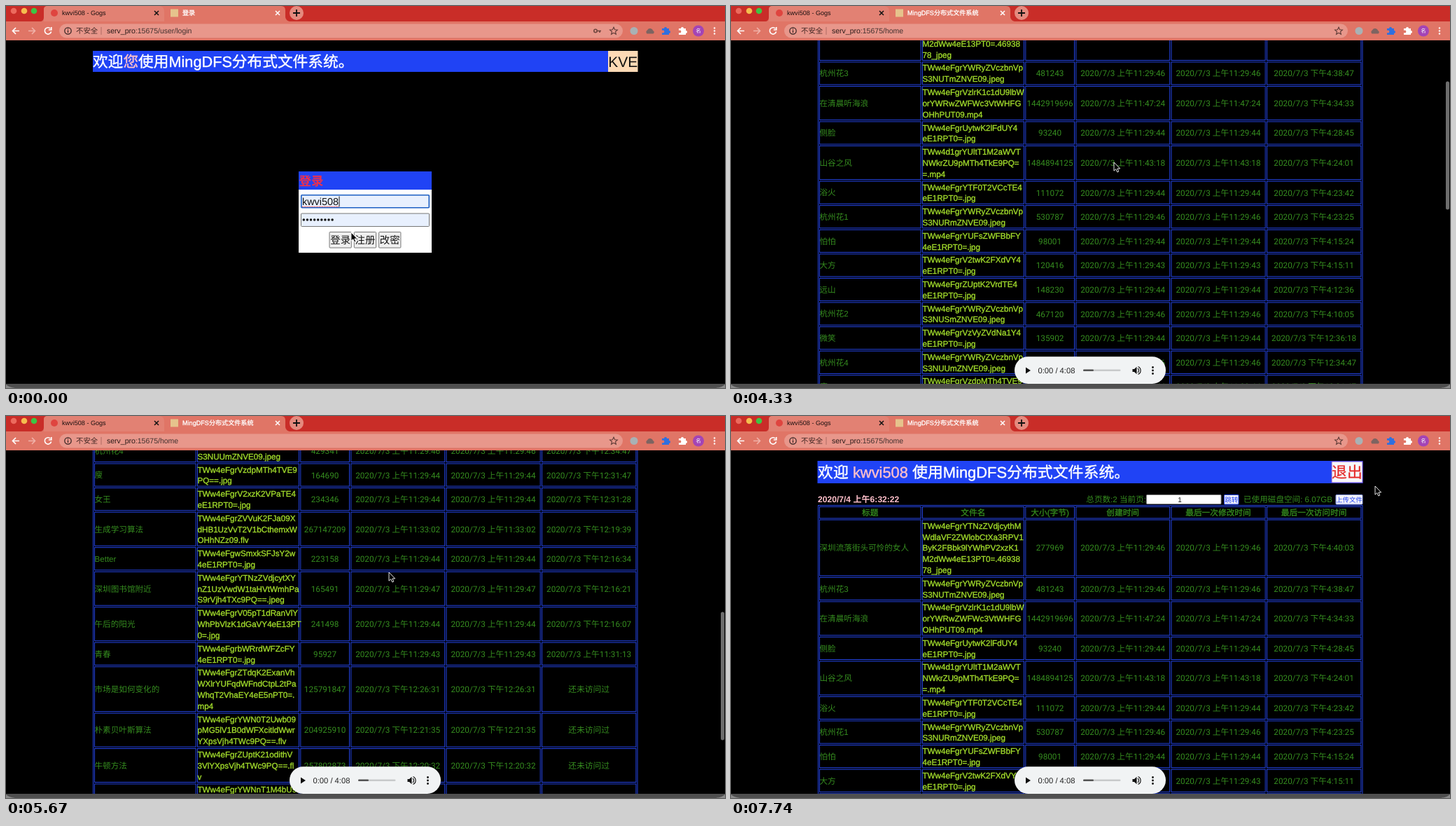
An HTML page that plays this animation: 1027x545 px, repeating every 8 s.

```html
<!DOCTYPE html>
<html lang="zh-CN">
<head>
<meta charset="utf-8">
<title>MingDFS</title>
<style>
html, body { margin: 0; width: 100%; height: 100%; overflow: hidden; background: #000; }
svg { display: block; width: 100vw; height: 100vh; }
text { font-family: "Liberation Sans", "Noto Sans CJK SC", "Noto Sans CJK", sans-serif; white-space: pre; text-rendering: geometricPrecision; }
.num { font-family: Roboto, "Noto Sans CJK SC", "Noto Sans CJK", sans-serif; }
</style>
</head>
<body>
<svg id="stage" viewBox="0 0 1027 545"></svg>
<script>
const LOOP = 8000, STEP = 148.8;
const BLUE = '#2043f5', LINE = '#2444e4', GREEN = '#358c1f', LIME = '#a2dc2c', PINK = '#ffc0cb', BAR = '#e07566';
const USER = 'kwvi508';

// title | size | created | last access | file name lines
const ROWS = `深圳流落街头可怜的女人|277969|A11:29:46|P4:40:03|TWw4eFgrYTNzZVdjcythM WdlaVF2ZWlobCtXa3RPV1 ByK2FBbk9lYWhPV2xzK1 M2dWw4eE13PT0=.46938 78_jpeg
杭州花3|481243|A11:29:46|P4:38:47|TWw4eFgrYWRyZVczbnVp S3NUTmZNVE09.jpeg
在清晨听海浪|1442919696|A11:47:24|P4:34:33|TWw4eFgrVzlrK1c1dU9lbW orYWRwZWFWc3VtWHFG OHhPUT09.mp4
侧脸|93240|A11:29:44|P4:28:45|TWw4eFgrUytwK2lFdUY4 eE1RPT0=.jpg
山谷之风|1484894125|A11:43:18|P4:24:01|TWw4d1grYUltT1M2aWVT NWkrZU9pMTh4TkE9PQ= =.mp4
浴火|111072|A11:29:44|P4:23:42|TWw4eFgrYTF0T2VCcTE4 eE1RPT0=.jpg
杭州花1|530787|A11:29:46|P4:23:25|TWw4eFgrYWRyZVczbnVp S3NURmZNVE09.jpeg
怕怕|98001|A11:29:44|P4:15:24|TWw4eFgrYUFsZWFBbFY 4eE1RPT0=.jpg
大方|120416|A11:29:43|P4:15:11|TWw4eFgrV2twK2FXdVY4 eE1RPT0=.jpg
远山|148230|A11:29:44|P4:12:36|TWw4eFgrZUptK2VrdTE4 eE1RPT0=.jpg
杭州花2|467120|A11:29:46|P4:10:05|TWw4eFgrYWRyZVczbnVp S3NUSmZNVE09.jpeg
微笑|135902|A11:29:44|P12:36:18|TWw4eFgrVzVyZVdNa1Y4 eE1RPT0=.jpg
杭州花4|429341|A11:29:46|P12:34:47|TWw4eFgrYWRyZVczbnVp S3NUUmZNVE09.jpeg
廋|164690|A11:29:44|P12:31:47|TWw4eFgrVzdpMTh4TVE9 PQ==.jpg
女王|234346|A11:29:44|P12:31:28|TWw4eFgrV2xzK2VPaTE4 eE1RPT0=.jpg
生成学习算法|267147209|A11:33:02|P12:19:39|TWw4eFgrZVVuK2FJa09X dHB1UzVvT2V1bCthemxW OHhNZz09.flv
Better|223158|A11:29:44|P12:16:34|TWw4eFgwSmxkSFJsY2w 4eE1RPT0=.jpg
深圳图书馆附近|165491|A11:29:47|P12:16:21|TWw4eFgrYTNzZVdjcytXY nZ1UzVwdW1taHVtWmhPa S9rVjh4TXc9PQ==.jpeg
午后的阳光|241498|A11:29:44|P12:16:07|TWw4eFgrV05pT1dRanVlY WhPbVlzK1dGaVY4eE13PT 0=.jpg
青春|95927|A11:29:43|A11:31:13|TWw4eFgrbWRrdWFZcFY 4eE1RPT0=.jpg
市场是如何变化的|125791847|P12:26:31|-|TWw4eFgrZTdqK2ExanVh WXlrYUFqdWFndCtpL2tPa WhqT2VhaEY4eE5nPT0=. mp4
朴素贝叶斯算法|204925910|P12:21:35|-|TWw4eFgrYWN0T2Uwb09 pMG5lV1B0dWFXcitldWwr YXpsVjh4TWc9PQ==.flv
牛顿方法|257802873|P12:20:32|-|TWw4eFgrZUptK21odithV 3VlYXpsVjh4TWc9PQ==.fl v
最优间隔分类器问题|210423553|A11:33:52|-|TWw4eFgrYWNnT1M4bU9 tWHRPbWFsT1dJaHVleHU rV1pxT21YcnVtaW1GOHhN Zz09.flv
欠拟合与过拟合的概念|258356055|A11:32:00|-|TWw4eFgrYXNvT2FMbitX UWlPUzRqdWkvaCthTG4r V1FpT2VhaE9hbWd1Vy90V jh4TWc9PQ==.flv
监督学习应用.梯度下降|261730418|A11:31:13|-|TWw4eFgrZWJrZWVkbytl dHB1UzVvT1c2bE9lVXFD NWkrZU9tK1dRanVpcEY4 eE1nPT0=.flv`
  .split('\n').map(r => r.split('|'));

const HEADS = ['标题', '文件名', '大小(字节)', '创建时间', '最后一次修改时间', '最后一次访问时间'];
const COLS = [126, 273, 420.3, 492.3, 628.5, 765, 901.7];
const COLS_EMPTY = [126, 181, 261, 383.5, 488.5, 695, 901.7];

const attrs = o => Object.entries(o).map(([k, v]) => ` ${k}="${v}"`).join('');
const rect = (x, y, w, h, fill, o = {}) => `<rect x="${x}" y="${y}" width="${w}" height="${h}" fill="${fill}"${attrs(o)}/>`;
const circle = (x, y, r, fill, o = {}) => `<circle cx="${x}" cy="${y}" r="${r}" fill="${fill}"${attrs(o)}/>`;
const path = (d, fill, stroke = 'none', w = 1, o = {}) => `<path d="${d}" fill="${fill}" stroke="${stroke}" stroke-width="${w}"${attrs(o)}/>`;
// y is the middle of the line
const text = (x, y, s, size, fill, o = {}) => `<text x="${x}" y="${y + size * 0.36}" font-size="${size}" fill="${fill}"${attrs(o)}>${s}</text>`;
const MID = { 'text-anchor': 'middle' }, BOLD = { 'font-weight': 'bold' }, NUM = { ...MID, class: 'num' };
const heavy = (ink, w) => ({ stroke: ink, 'stroke-width': w });
const group = (id, body, o = {}) => `<g id="${id}"${attrs(o)}>${body}</g>`;
const box = (x, y, w, h, fill, stroke, o = {}) => rect(x + .5, y + .5, w - 1, h - 1, fill, { stroke, ...o });

const stamp = s => s === '-' ? '还未访问过' : '2020/7/3 ' + s.replace('A', '上午').replace('P', '下午');
const center = (cols, i) => (cols[i] + cols[i + 1] - 1.5) / 2;
const cells = (cols, y, h) => cols.slice(0, 6).map((x, i) => box(x, y, cols[i + 1] - x - 1.3, h, 'none', LINE)).join('');
const headRow = cols => cells(cols, 129, 17.5) +
  HEADS.map((s, i) => text(center(cols, i), 138, s, 11.7, GREEN, { ...MID, ...heavy(GREEN, .3) })).join('');

let rowTop = 147.6;
const places = ROWS.map(r => {
  const lines = r[4].split(' '), h = 2.9 + 15.85 * lines.length, y = rowTop;
  rowTop += h;
  return { lines, y, h, mid: y + h / 2 - .5 };
});

function tableRow([title, size, made, seen], i) {
  const { lines, y, h, mid } = places[i];
  const cell = (c, s) => text(center(COLS, c), mid, s, 11.75, GREEN, NUM);
  return cells(COLS, y, h - 1.4) + text(126.5, mid, title, 11.6, GREEN) +
    lines.map((s, n) => text(273.5, mid + (n - (lines.length - 1) / 2) * 15.85, s, 11.65, LIME, heavy(LIME, .35))).join('') +
    cell(2, size) + cell(3, stamp(made)) + cell(4, stamp(made)) + cell(5, stamp(seen));
}

function hoverCell(id, i) {
  const { y, h, mid } = places[i];
  return group(id, rect(COLS[3] + 1, y + 1, 133, h - 3.4, '#808080') +
    text(center(COLS, 3), mid, stamp(ROWS[i][2]), 11.75, '#fff', { ...NUM, ...heavy('#fff', .35) }));
}

const puzzle = (x, fill) => path(`M${x - 5} 32h3a2 2 0 1 1 4 0h3v3a2 2 0 1 1 0 4v2h-10v-3a2 2 0 1 0 0-3z`, fill);
const chromeBar =
  rect(0, 0, 1027, 23, '#c92d28') + rect(0, 22, 1027, 27, BAR) +
  path('M50 22Q54 21 54 16V5Q54 0 60 0H393Q399 0 399 6V16Q400 21 405 22Z', BAR) +
  path('M54 22V5Q54 0 60 0H220Q226 1 226 8V22Z', '#e28173') +
  [['#ec6a5e', 11], ['#f5bd4f', 26], ['#3ec544', 40]].map(([c, x]) => circle(x, 7, 4.3, c)).join('') +
  circle(69, 10, 5, '#df453f') + text(80, 10, USER + ' - Gogs', 9.1, '#1a1010') +
  path('M212 7l6 6m0-6l-6 6', 'none', '#111', 1.5) + path('M385 7l6 6m0-6l-6 6', 'none', '#fff', 1.5) +
  circle(415, 10, 10, '#e58a7e') + path('M410 10h10m-5-5v10', 'none', '#111', 1.8) +
  path('M19 35.500H9.500m4.500-4.500l-4.500 4.500l4.500 4.500', 'none', '#fff', 1.7) +
  path('M32 35.500h9.500m-4.500-4.500l4.500 4.500l-4.500 4.500', 'none', '#f0b2a9', 1.6) +
  rect(76, 25.5, 805, 20, '#e8978b', { rx: 10 }) +
  circle(88.5, 35.5, 4.7, 'none', heavy('#302020', 1.2)) + path('M88.500 34.500v3.500m0-5.500v1', 'none', '#302020', 1.2) +
  text(100, 35.5, '不安全', 10.4, '#402522') + rect(135.5, 30, 1, 11, '#b06d64') +
  path('M868 30.200l1.600 3.500l3.800.4l-2.900 2.500l.9 3.700l-3.400-2l-3.400 2l.9-3.700l-2.900-2.500l3.800-.4z', 'none', '#5c3a36', 1.1) +
  circle(897, 35.5, 5.5, '#a9b1b4') +
  path('M915.500 39.500a3 3 0 0 1 .5-5a4.500 4.500 0 0 1 8.300.8a2.300 2.300 0 0 1 .2 4.200z', '#7d6461') +
  puzzle(942, '#2f6fe0') + puzzle(966, '#fff') +
  circle(989, 35.5, 8, '#a344b5') + text(989, 35.5, '名', 7.5, '#fff', MID) +
  [31.5, 35.5, 39.5].map(y => circle(1012, y, 1.2, '#fff')).join('') +
  group('reload', path('M63.500 32.200A4.700 4.700 0 1 0 64.600 36.500M64.800 30v4h-4', 'none', '#fff', 1.6)) +
  group('stop', path('M56 31.500l8 8m0-8l-8 8', 'none', '#fff', 1.7)) +
  group('favicon', rect(235, 4.5, 11, 11, '#e6c38c')) +
  group('spinner', path('M242 5.500A4.800 4.800 0 0 1 244 14', 'none', '#fff', 1.5)) +
  group('key', circle(842, 35.5, 2.2, 'none', heavy('#70463f', 1.6)) + path('M844 35.500h6m-2 0v2.500', 'none', '#70463f', 1.7)) +
  '<text id="tab" x="252" y="13.300" font-size="9.1" fill="#fff" stroke="#fff" stroke-width=".3"></text>' +
  '<text id="url" x="144" y="39.200" font-size="10.5" fill="#40302e"></text>';

const button = (x, y, w, h, s, size, fill, ink, edge) => box(x, y, w, h, fill, edge, { rx: 1 }) + text(x + w / 2, y + h / 2, s, size, ink, MID);

const login =
  rect(124, 64, 778, 30, BLUE) +
  text(124, 79, `欢迎<tspan fill="${PINK}" stroke="${PINK}">您</tspan>使用MingDFS分布式文件系统。`, 21.7, '#fff', heavy('#fff', .4)) +
  rect(860, 64, 42.5, 30, '#fdd9b5') + text(881.2, 79, 'KVE', 21, '#111', MID) +
  rect(418, 236, 190, 116, '#fff') + rect(418, 236, 190, 26, BLUE) +
  text(418.5, 249.5, '登录', 17.5, '#f0304a', BOLD) +
  rect(421.8, 269.8, 182.5, 18, '#e8f0fe', { ...heavy('#1c5fc4', 1.6), rx: 1 }) +
  text(423, 279, USER, 14.4, '#111') + path('M423 286.300h52', 'none', '#e33', 1.2, { 'stroke-dasharray': '1.2 1.2' }) +
  rect(475.5, 271.5, 1, 15, '#111') +
  box(421, 295.5, 184, 19.5, '#e8f0fe', '#767676', { rx: 1 }) +
  Array.from({ length: 9 }, (_, i) => circle(425.3 + i * 5.1, 305, 1.75, '#111')).join('') +
  ['登录', '注册', '改密'].map((s, i) => button(461.5 + i * 35.3, 322, 32.3, 23.5, s, 14.4, '#efefef', '#111', '#767676')).join('') +
  group('press', rect(462, 322.5, 31.3, 22.5, '#000', { opacity: .12 }));

const alertBox = group('alert',
  rect(347, 46, 328, 93, '#000', { rx: 8, opacity: .18 }) + rect(350, 46, 322, 90, '#fff', { rx: 6 }) +
  text(362, 63, 'serv_pro:15675 显示', 11, '#202124') + text(362, 86, '登录成功', 9.5, '#5f6368') +
  rect(614, 107, 46, 22, '#1a73e8', { rx: 3 }) + text(637, 118, '确定', 9.5, '#fff', MID));

const homeTop =
  rect(123.5, 64, 779, 32, BLUE) +
  text(124, 80, `欢迎 <tspan fill="${PINK}" stroke="${PINK}">${USER}</tspan> 使用MingDFS分布式文件系统。`, 21.9, '#fff', heavy('#fff', .4)) +
  box(857.5, 64.5, 45, 31, '#f7f7fb', '#7a52c8') + text(880, 80, '退出', 21.9, '#e52a28', { ...MID, ...heavy('#e52a28', .3) }) +
  `<text id="clock" x="124" y="122.500" fill="${PINK}" font-weight="bold"></text>` +
  `<text id="pages" x="593" y="122.500" font-size="11.6" fill="${GREEN}" text-anchor="end"></text>` +
  box(593, 112, 107.5, 14, '#fff', '#888', { rx: 1 }) + text(641, 119.3, '1', 10, '#111', MID) +
  button(704, 112, 21.5, 14.5, '跳转', 9.6, '#f0f0fa', BLUE, BLUE) +
  text(732, 118.5, '已使用磁盘空间: 6.07GB', 11.6, GREEN) +
  button(863.5, 112, 39, 14.5, '上传文件', 9.4, '#f4f4fb', BLUE, '#8899e8');

const home = homeTop +
  group('empty', box(124, 127, 778.5, 21.5, 'none', LINE) + headRow(COLS_EMPTY)) +
  group('full', box(124, 127, 778.5, rowTop - 126, 'none', LINE) + headRow(COLS) + ROWS.map(tableRow).join('') +
    hoverCell('hoverA', 0) + hoverCell('hoverB', 18));

const speaker = (x, fill) => path(`M${x - 5.500} 518v4h2.500l3.500 3.300v-10.600l-3.500 3.300z`, fill) +
  path(`M${x + 2} 517a3.800 3.800 0 0 1 0 6m.500-8.500a6 6 0 0 1 0 11`, 'none', fill, 1.2);
const player = rect(405, 500.3, 216, 38.7, '#f1f3f4', { rx: 19.3 }) +
  path('M421 515.500v9l7-4.500z', '#111') +
  '<text id="length" x="438.500" y="524" font-size="11.2" fill="#222"></text>' +
  group('idle', rect(503, 518.5, 76.5, 2.6, '#cdcfd0', { rx: 1.3 }) + speaker(602, '#a9abac')) +
  group('ready', rect(503, 518.5, 53.5, 2.6, '#c8cacb', { rx: 1.3 }) + rect(503, 518.5, 15, 2.6, '#555', { rx: 1.3 }) +
    speaker(579, '#111') + [515.5, 520, 524.5].map(y => circle(602.5, y, 1.4, '#111')).join(''));

const stage = document.getElementById('stage');
stage.innerHTML =
  '<clipPath id="view"><rect y="49" width="1027" height="490"/></clipPath>' +
  rect(0, 0, 1027, 545, '#000') +
  `<g clip-path="url(#view)">${group('login', login)}${group('home', home)}${group('player', player)}
   ${group('thumb', rect(1021, 0, 5, 183, '#6d6d6d', { rx: 2.5 }))}</g>` +
  rect(0, 539, 1027, 6, '#4f4f4f') +
  path('M0 540Q4 544 13 545H0ZM1027 540Q1023 544 1014 545H1027Z', '#8b8b8b') +
  chromeBar + alertBox +
  group('arrow', path('M0 0V12.200L2.800 9.700L4.800 14L6.800 13.100L4.900 9H8.700Z', '#000', '#fff', .9)) +
  group('beam', path('M-2.500-5.500Q0-5.500 0-4V4Q0 5.500-2.500 5.500M2.500-5.500Q0-5.500 0-4M0 4Q0 5.500 2.500 5.500', 'none', '#222', 1.1));

const el = {};
stage.querySelectorAll('[id]').forEach(n => el[n.id] = n);

// keys: [time, ...values]
function track(keys, t) {
  const i = keys.findIndex(k => k[0] > t);
  if (i < 0) return keys[keys.length - 1].slice(1);
  if (i === 0) return keys[0].slice(1);
  const a = keys[i - 1], b = keys[i], u = (t - a[0]) / (b[0] - a[0]);
  return a.slice(1).map((v, n) => v + (b[n + 1] - v) * u);
}

const POINTER = [[0, 493, 323], [148, 493, 323], [290, 486, 331], [590, 486, 331], [890, 580, 190], [1040, 598, 157],
  [1335, 632, 118], [1790, 632, 118], [2080, 602, 165], [2520, 547, 223], [6990, 547, 223], [7700, 920, 100]];
const SCROLL = [[4160, 0], [4315, 150], [4464, 400], [4613, 607.5], [4762, 668], [4910, 690], [5059, 724], [5208, 762.5],
  [5357, 808], [5506, 808], [5654, 610], [5803, 300], [5952, 60], [6100, -1.5], [6400, -1.3], [6750, 0]];
const TICKS = [3730, 4760, 5800, 6850, 7735];

const show = (id, on) => { el[id].style.display = on ? '' : 'none'; };
const move = (id, x, y) => el[id].setAttribute('transform', `translate(${x} ${y})`);
const set = (id, s) => { if (el[id].innerHTML !== s) el[id].innerHTML = s; };

function render(time) {
  const t = Math.floor(time / STEP) * STEP;
  const between = (a, b) => t >= a && t < b;
  const atHome = t >= 1630, loaded = t >= 2080, titled = t >= 2230, timed = time >= 2830;

  show('login', !atHome);
  show('home', atHome);
  show('player', atHome);
  show('press', between(290, 440));
  show('alert', between(440, 1630));
  show('empty', !loaded);
  show('full', loaded);
  show('idle', !loaded);
  show('ready', loaded);
  show('reload', !atHome || titled);
  show('stop', atHome && !titled);
  show('spinner', atHome && !titled);
  show('favicon', !atHome || titled);
  show('key', !atHome);
  show('hoverA', between(2520, 4310) || between(6540, 7130));
  show('hoverB', between(4900, 5350));

  set('tab', !atHome ? '登录' : titled ? 'MingDFS分布式文件系统' : 'serv_pro:15675/home');
  set('url', `<tspan fill="#2a1a18">serv_pro</tspan>:15675/${atHome ? 'home' : 'user/login'}`);
  set('pages', `总页数:${loaded ? 2 : '正在获取'} 当前页:`);
  set('length', `0:00 / ${loaded ? '4:08' : '0:00'}`);
  set('clock', timed ? '2020/7/4 上午6:32:' + (17 + TICKS.filter(k => time >= k).length) : '正在获取当前时间');
  el.clock.setAttribute('font-size', timed ? 12.1 : 11.5);

  const [scroll] = track(SCROLL, t);
  move('home', 0, -scroll);
  move('player', 0, Math.max(0, -scroll));
  move('thumb', 0, 51 + Math.max(0, scroll) / 808 * 303);
  el.thumb.style.opacity = t < 4300 ? 0 : track([[6800, 1], [7100, 0]], t)[0];

  const [x, y] = track(POINTER, t), beam = between(1630, 1930);
  show('arrow', !beam);
  show('beam', beam);
  move('arrow', x, y);
  move('beam', x, y + 5);
}

const start = performance.now();
(function frame() {
  render((performance.now() - start) % LOOP);
  requestAnimationFrame(frame);
})();
</script>
</body>
</html>
```
